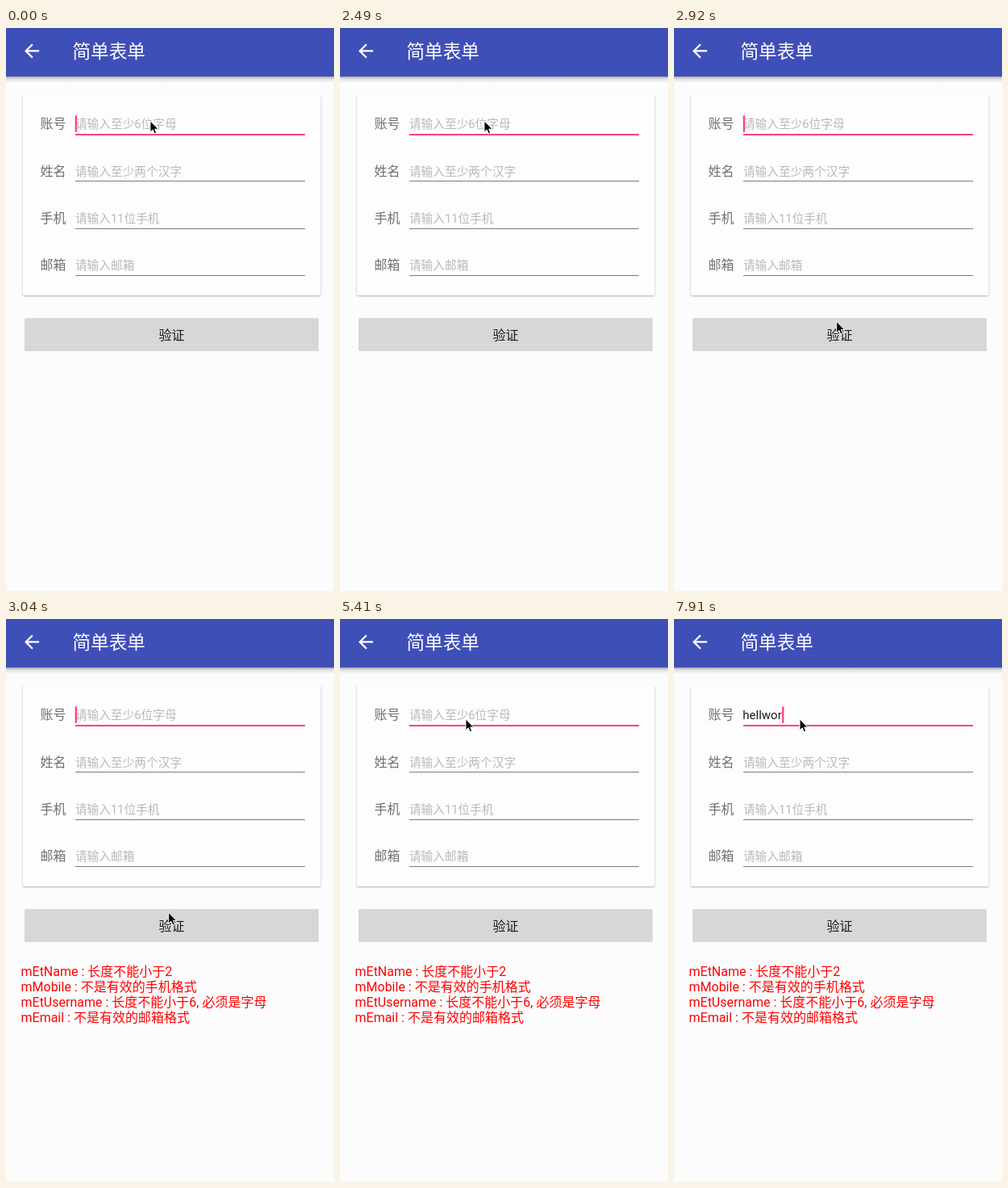
These frames come from a looping animation (407 px wide and 697 px high, 8 s). An HTML page:

```html
<!DOCTYPE html>
<html lang="zh-CN">
<head>
<meta charset="utf-8">
<title>简单表单</title>
<style>
  html, body { margin: 0; width: 100%; height: 100%; overflow: hidden; background: #fcfcfc; }
  svg { display: block; width: 407px; height: 697px; }
  text { font-family: Roboto, "Noto Sans CJK SC", "Noto Sans CJK", sans-serif; font-size: 16px; }
  .title { font-size: 22.6px; fill: #fff; }
  .label { fill: #6f6f6f; }
  .hint { font-size: 14.7px; fill: #b9b9b9; }
  .entry { font-size: 15px; fill: #1c1c1c; }
  .action { fill: #1c1c1c; text-anchor: middle; }
  .error { fill: #f00; }
  .card { fill: #fdfdfd; filter: drop-shadow(0 1px 1.2px rgba(0, 0, 0, .3)); }
  .button { fill: #d6d7d7; filter: drop-shadow(0 .5px .4px rgba(0, 0, 0, .12)); }
</style>
</head>
<body>
<svg id="stage" viewBox="0 0 407 697">
  <defs>
    <linearGradient id="shade" x2="0" y2="1">
      <stop offset="0" stop-color="#000" stop-opacity=".36"/>
      <stop offset=".35" stop-color="#000" stop-opacity=".12"/>
      <stop offset="1" stop-color="#000" stop-opacity="0"/>
    </linearGradient>
  </defs>
  <rect width="407" height="697" fill="#fcfcfc"/>
  <rect y="60" width="407" height="8" fill="url(#shade)"/>
  <rect width="407" height="60" fill="#3f4fb8"/>
  <path transform="translate(18.5 14.9) scale(1.13)" fill="#fff"
    d="M20 11H7.83l5.59-5.59L12 4l-8 8 8 8 1.41-1.41L7.83 13H20z"/>
  <text class="title" x="82.5" y="37.3">简单表单</text>
  <rect class="card" x="21" y="82" width="369.5" height="249" rx="2"/>
  <g id="rows"></g>
  <text id="entry" class="entry" x="85.3" y="124"></text>
  <rect id="caret" y="108.3" width="2.3" height="20.5" fill="#ff4081"/>
  <rect class="button" x="23" y="359.3" width="365" height="40.7" rx="1.5"/>
  <text class="action" x="205.6" y="386.3">验证</text>
  <g id="errors"></g>
  <path id="mouse" fill="#000" stroke="#fff" stroke-width="1" stroke-linejoin="round"
    d="M0 0V14L3.2 11 5.3 15.8 7.7 14.8 5.7 10.2H10Z"/>
</svg>
<script>
const LOOP = 8000;
const $ = id => document.getElementById(id);

function add(parent, tag, attrs, content = '') {
  const node = document.createElementNS('http://www.w3.org/2000/svg', tag);
  for (const key in attrs) node.setAttribute(key, attrs[key]);
  node.textContent = content;
  return parent.appendChild(node);
}

const fields = [
  ['账号', '请输入至少6位字母'],
  ['姓名', '请输入至少两个汉字'],
  ['手机', '请输入11位手机'],
  ['邮箱', '请输入邮箱']
];
const hints = fields.map(([label, hint], i) => {
  const y = 124.4 + i * 58.2;
  const focused = i === 0;
  add($('rows'), 'text', { class: 'label', x: 42.5, y }, label);
  add($('rows'), 'rect', {
    x: 86, y: Math.round(131 + i * 58.3), width: 285,
    height: focused ? 2 : 1, fill: focused ? '#ff4081' : '#7b7b7b'
  });
  return add($('rows'), 'text', { class: 'hint', x: 85.9, y }, hint);
});

[
  'mEtName : 长度不能小于2',
  'mMobile : 不是有效的手机格式',
  'mEtUsername : 长度不能小于6, 必须是字母',
  'mEmail : 不是有效的邮箱格式'
].forEach((line, i) => add($('errors'), 'text', { class: 'error', x: 18.5, y: 442.4 + i * 18.8 }, line));

// time, typed text, caret visible
const typing = [
  [0, '', 1], [240, '', 0], [720, '', 1],
  [1140, 'h', 1], [1190, 'he', 1], [1730, 'he', 0], [1840, 'h', 1],
  [1960, '', 1], [2430, '', 0], [2920, '', 1], [3460, '', 0],
  [3920, '', 1], [4450, '', 0], [4930, '', 1], [5410, '', 0],
  [5940, 'h', 1], [6060, 'he', 1], [6240, 'hel', 1], [6360, 'hell', 1],
  [6900, 'hell', 0], [7380, 'hell', 1],
  [7680, 'hellw', 1], [7790, 'hellwo', 1], [7910, 'hellwor', 1]
];

// time, x, y of the pointer tip
const pointer = [
  [0, 179, 115], [2500, 178, 138], [2560, 174, 200], [2620, 170, 270],
  [2680, 158, 325], [2740, 172, 345], [2800, 192, 358], [2860, 201.7, 363.3],
  [3160, 198, 330], [3220, 177, 235], [3280, 170, 190], [3340, 161, 152],
  [3400, 157, 133], [3560, 156, 123.8]
];

const ERRORS_AT = 3040;
const stepAt = (steps, t) => steps.findLast(step => step[0] <= t);
const show = (node, on) => node.setAttribute('visibility', on ? 'visible' : 'hidden');

function draw(t) {
  const [, typed, caretOn] = stepAt(typing, t);
  const [, x, y] = stepAt(pointer, t);
  const entry = $('entry');
  if (entry.textContent !== typed) entry.textContent = typed;
  show(hints[0], !typed);
  $('caret').setAttribute('x', 85.7 + (typed ? entry.getComputedTextLength() : 0));
  show($('caret'), caretOn);
  show($('errors'), t >= ERRORS_AT);
  $('mouse').setAttribute('transform', `translate(${x} ${y})`);
}

const start = performance.now();
function tick() {
  draw((performance.now() - start) % LOOP);
  requestAnimationFrame(tick);
}
tick();
</script>
</body>
</html>
```
